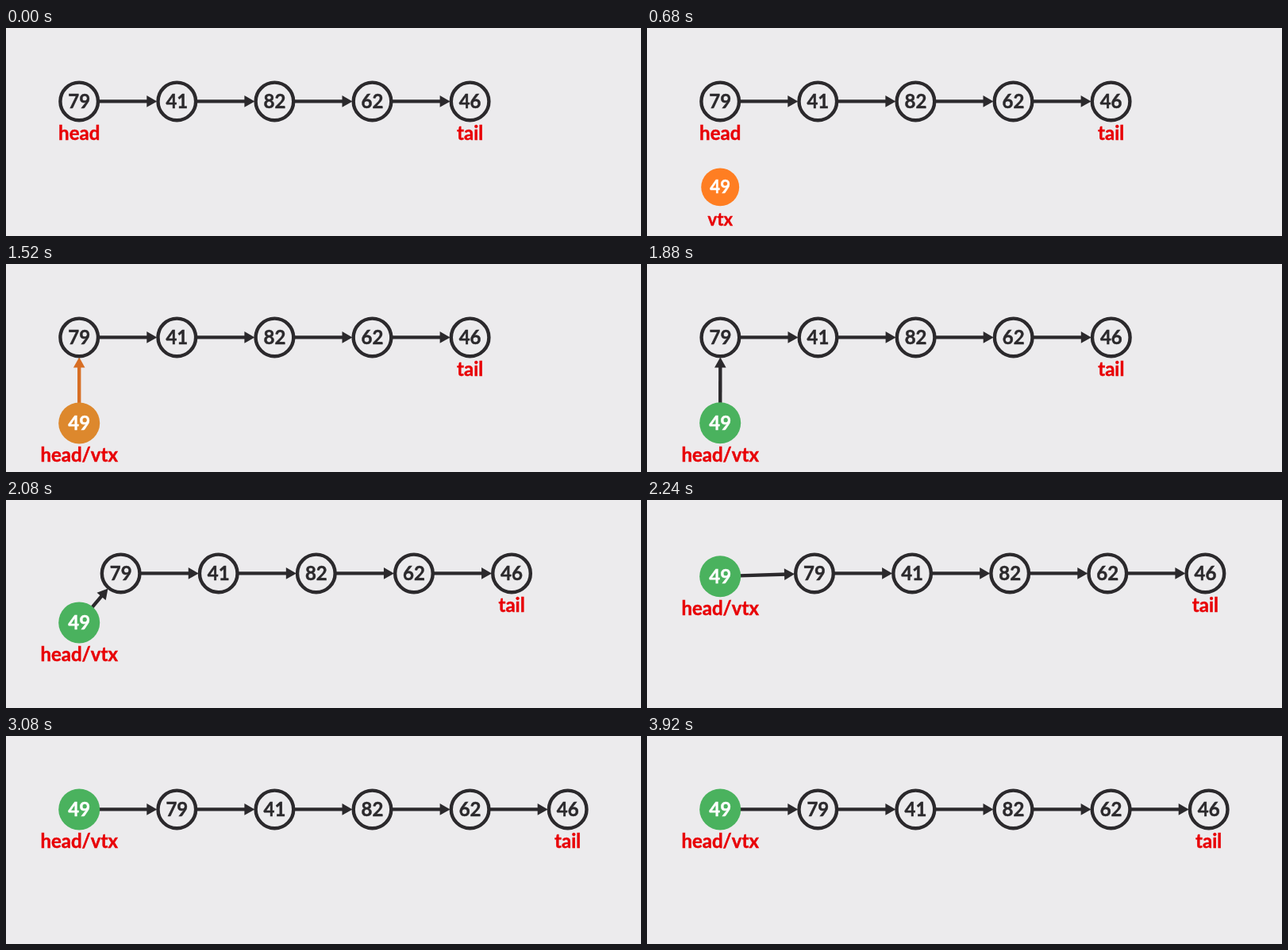
Animation of 800x262 px, one loop 4 s. Source, as an HTML page:

```html
<!DOCTYPE html>
<html lang="en">
<head>
<meta charset="utf-8">
<title>Linked list: insert at head</title>
<style>
html, body { margin: 0; width: 100%; height: 100%; overflow: hidden; background: #ecebed; }
svg { display: block; width: 100vw; height: 100vh; }
text { font: 700 24px Lato, "Open Sans", sans-serif; text-anchor: middle; stroke-width: .45; }
.ring { fill: #ecebed; stroke: #2b292c; stroke-width: 4.4; }
.num { fill: #2b292c; stroke: #2b292c; }
.new { fill: #fff; stroke: #fff; }
.label { fill: #e80006; stroke: #e80006; }
</style>
</head>
<body>
<svg id="stage" viewBox="0 0 800 262"></svg>
<script>
const LOOP = 4000, STEP = 500;
const T = { grow: 316, link: 812, mark: 1340, move: 1844 };
const X0 = 92.2, Y0 = 92.4, GAP = 123.1, DROP = 108, R = 26;
const INK = [43, 41, 44], ORANGE = [255, 126, 34], GREEN = [74, 178, 94];
const stage = document.getElementById("stage");

function add(parent, tag, attrs, content) {
  const el = document.createElementNS("http://www.w3.org/2000/svg", tag);
  set(el, attrs);
  if (content) el.textContent = content;
  parent.appendChild(el);
  return el;
}

function set(el, attrs) {
  for (const key in attrs) el.setAttribute(key, attrs[key]);
}

const show = (el, on) => { el.style.display = on ? "" : "none"; };
const place = (el, x, y, s = 1) => set(el, { transform: `translate(${x} ${y}) scale(${s})` });
const mix = (a, b, p) => `rgb(${a.map((v, i) => Math.round(v + (b[i] - v) * p))})`;

// Cubic in-out progress of the step that begins at `start`
function ease(t, start) {
  const p = Math.min(1, Math.max(0, (t - start) / STEP));
  return p < .5 ? 4 * p ** 3 : 1 - 4 * (1 - p) ** 3;
}

function makeArrow() {
  const g = add(stage, "g", {});
  const line = add(g, "path", { "stroke-width": 4.4 });
  const tip = add(g, "path", { d: "M0 0L-13 -7.3V7.3Z" });
  return { g, line, tip };
}

function drawArrow(arrow, a, b, color) {
  const dx = b.x - a.x, dy = b.y - a.y, len = Math.hypot(dx, dy);
  const ux = dx / len, uy = dy / len;
  const at = (p, d) => `${p.x + ux * d} ${p.y + uy * d}`;
  set(arrow.line, { d: `M${at(a, R - 2)}L${at(b, -R - 8)}`, stroke: color });
  const angle = Math.atan2(dy, dx) * 180 / Math.PI;
  set(arrow.tip, { transform: `translate(${at(b, 1 - R)}) rotate(${angle})`, fill: color });
}

const values = [79, 41, 82, 62, 46];
const arrows = values.slice(1).map(makeArrow);
const newArrow = makeArrow();
const beam = add(stage, "path", { "stroke-width": 15.5, stroke: mix(ORANGE, ORANGE, 0) });

const nodes = values.map(value => {
  const g = add(stage, "g", {});
  add(g, "circle", { r: R - 2.2, class: "ring" });
  add(g, "text", { y: 8.6, class: "num" }, value);
  return g;
});
const fresh = add(stage, "g", {});
const disc = add(fresh, "circle", { r: R });
const freshNum = add(fresh, "text", { class: "new" }, "49");
const makeLabel = (parent, word) => add(parent, "text", { y: 48.6, class: "label" }, word);
const headLabel = makeLabel(nodes[0], "head");
makeLabel(nodes[4], "tail");
const freshLabel = makeLabel(fresh, "vtx");

function draw(t) {
  const grow = ease(t, T.grow), link = ease(t, T.link);
  const mark = ease(t, T.mark), move = ease(t, T.move);
  const marked = t >= T.mark;
  const spots = values.map((_, i) => ({ x: X0 + GAP * (i + move), y: Y0 }));
  const start = { x: X0, y: Y0 + DROP * (1 - move) };

  nodes.forEach((g, i) => place(g, spots[i].x, spots[i].y));
  arrows.forEach((arrow, i) => drawArrow(arrow, spots[i], spots[i + 1], mix(INK, INK, 0)));
  show(headLabel, !marked);

  show(fresh, grow > 0);
  place(fresh, start.x, start.y);
  set(disc, { r: R * grow, fill: mix(ORANGE, GREEN, mark) });
  place(freshNum, 0, 8.6 * grow, grow);
  freshLabel.textContent = marked ? "head/vtx" : "vtx";
  set(freshLabel, { y: 0 });
  place(freshLabel, 0, 48.6, grow);

  show(beam, link > 0 && !marked);
  const reach = start.y - R - (DROP - 2 * R) * link;
  set(beam, { d: `M${X0} ${start.y - R + 4}V${reach}` });

  show(newArrow.g, marked);
  drawArrow(newArrow, start, spots[0], mix(ORANGE, INK, mark));
}

const begin = performance.now();
function tick() {
  draw((performance.now() - begin) % LOOP);
  requestAnimationFrame(tick);
}
tick();
</script>
</body>
</html>
```
